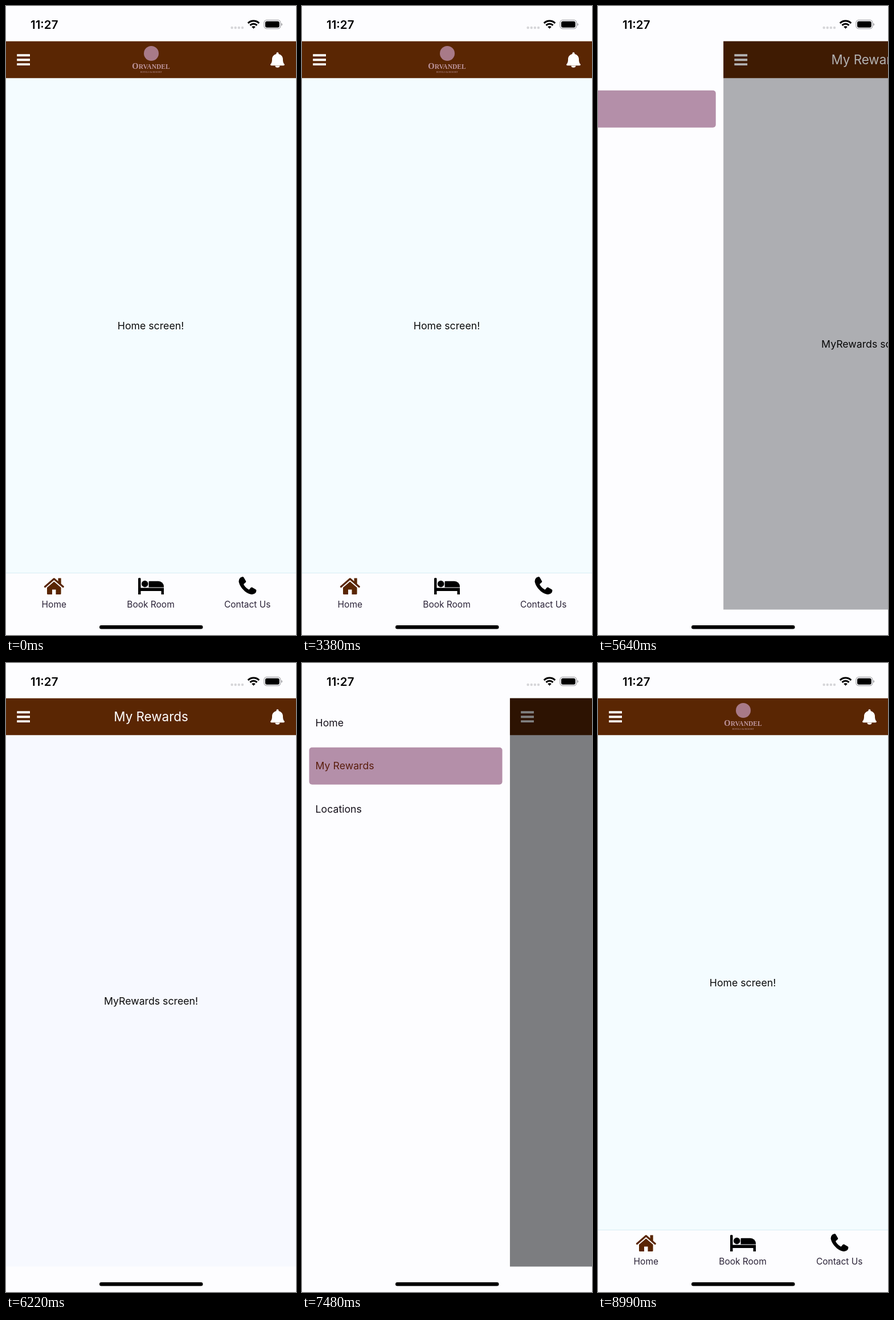
An HTML page that plays this animation: 509x1101 px, repeating every 9030 ms.

```html
<!DOCTYPE html>
<html lang="en">
<head>
<meta charset="utf-8">
<title>Drawer navigation</title>
<style>
  html, body { margin: 0; width: 100%; height: 100%; overflow: hidden; background: #fdfdff; }
  svg { display: block; width: 100vw; height: 100vh; font-family: Inter, sans-serif; }
  .mid { text-anchor: middle; }
  .body { font-size: 17.7px; fill: #0a0a0a; }
  .title { font-size: 22.4px; fill: #fff; }
  .tab { font-size: 15.5px; fill: #2b2338; }
  .logo { font-family: "Liberation Serif", serif; fill: #bd949c; }
  .brown { fill: #5a2603; }
</style>
</head>
<body>
<svg viewBox="0 0 509 1101" preserveAspectRatio="none">
  <defs>
    <clipPath id="safe"><rect y="61.5" width="509" height="995"/></clipPath>
    <g id="bell" fill="#fff">
      <path d="M476.500 81c-1.200 0-2 .9-2 2v1c-4.500 1-7.500 4.700-7.500 9.300 0 5-1.200 7-2.400 8.300-1 1.100-.6 2.600 1.200 2.600h21.400c1.800 0 2.200-1.500 1.200-2.600-1.200-1.300-2.400-3.300-2.400-8.300 0-4.600-3-8.300-7.500-9.300v-1c0-1.100-.8-2-2-2z"/>
      <path d="M472.500 104.500h8a4 3.300 0 0 1-8 0z"/>
    </g>
  </defs>

  <rect width="509" height="1101" fill="#fdfdff"/>

  <g clip-path="url(#safe)">
    <g id="slider">
      <g transform="translate(-365.4)">
        <rect id="focus" x="13" y="72" width="339" height="65" rx="5" fill="#b48fa9"/>
        <g class="body">
          <text class="label" x="24" y="110.500">Home</text>
          <text class="label" x="24" y="186.300">My Rewards</text>
          <text class="label" x="24" y="262">Locations</text>
        </g>
      </g>

      <rect y="61.500" width="509" height="65" class="brown"/>

      <g id="home">
        <rect y="126.500" width="509" height="866" fill="#f4fcff"/>
        <g class="logo mid">
          <circle cx="255" cy="83" r="13" fill="#a87a88"/>
          <text x="254.500" y="110" font-size="14.500" font-weight="bold">O<tspan font-size="11.500">RVANDEL</tspan></text>
          <text x="254.500" y="116.500" font-size="4.300">HOTELS &amp; RESORT</text>
        </g>
        <text class="body mid" x="254" y="565.500">Home screen!</text>

        <rect y="992.500" width="509" height="65" fill="#fdfdff"/>
        <path d="M0 992.500H509" stroke="#d6edf4"/>
        <g class="brown">
          <path d="M68.500 1016.500L84.300 1002.800 100.200 1016.500" fill="none" stroke="#5a2603" stroke-width="3.200" stroke-linecap="round" stroke-linejoin="round"/>
          <path d="M91.500 1001.500h5.200v11l-5.200-4.500z"/>
          <path d="M72 1018L84.300 1007.500 96.600 1018V1028.500q0 1.500-1.500 1.500H87.500V1021.500H81V1030H73.500q-1.500 0-1.500-1.500z"/>
        </g>
        <path d="M232 1002.500q0-1.500 1.500-1.500h1.500q1.500 0 1.500 1.500V1018.500H277V1030H272.500V1024H236.500V1030H232z"/>
        <circle cx="243.700" cy="1011.500" r="5.700"/>
        <path d="M250.500 1008q0-1.300 1.300-1.300H267.500a9.500 9.500 0 0 1 9.500 9.500v1.200H250.500z"/>
        <path transform="translate(408.500 999)" d="M7 0Q8.200-.1 9 1.600L12.600 7.800Q13.200 8.900 12 10L9.400 12.300Q8.400 13.200 9 14.300 12 19.300 17.200 22.300 18.200 22.800 19 21.800L21.200 19.100Q22.200 18 23.300 18.600L29.800 22.200Q31 22.900 30.900 24.200 30.700 26.500 29.800 28 27.500 30.600 23.200 31 17.500 30.800 11 25.800 2 18 .2 9.500-.4 6 1.600 3 3 .6 7 0z"/>
        <g class="tab mid">
          <text x="84.300" y="1053">Home</text>
          <text x="254" y="1053">Book Room</text>
          <text x="423.700" y="1053">Contact Us</text>
        </g>
      </g>

      <g id="rewards">
        <rect y="126.500" width="509" height="931" fill="#f7f9ff"/>
        <text class="title mid" x="254.500" y="102.300">My Rewards</text>
        <text class="body mid" x="254.500" y="597.500">MyRewards screen!</text>
      </g>

      <path id="burger" d="M19.200 86.300H42M19.200 94.200H42M19.200 102.100H42" stroke="#fff" stroke-width="3.900"/>
      <use href="#bell"/>
      <rect id="shade" y="61" width="509" height="997"/>
    </g>
  </g>

  <text x="43" y="39.800" font-size="20.500" font-weight="600">11:27</text>
  <path d="M396.600 38H416" stroke="#d6d6d9" stroke-width="4.400" stroke-linecap="round" stroke-dasharray="0 6.130"/>
  <g transform="translate(434.500 39.800)" fill="none" stroke="#000" stroke-width="3.100">
    <path d="M-9.700-9.700A13.700 13.700 0 0 1 9.700-9.700M-6-6A8.500 8.500 0 0 1 6-6"/>
    <path d="M0 0L-3.300-3.300A4.700 4.700 0 0 1 3.300-3.300z" fill="#000" stroke="none"/>
  </g>
  <rect x="453" y="24.700" width="28.800" height="15" rx="4.600" fill="none" stroke="#a4a4a8" stroke-width="1.300"/>
  <rect x="455" y="26.700" width="24.800" height="11" rx="2.900"/>
  <path d="M483.200 29.700q1.900 .8 1.900 2.500t-1.900 2.500z" fill="#a4a4a8"/>
  <rect x="164" y="1084" width="181.500" height="6.500" rx="3.250"/>
</svg>

<script>
  const LOOP = 9030, DRAWER = 365.4, OMEGA = Math.sqrt(1000 / 3) / 1000;
  const moves = [[4664, 1], [5566, 0], [6987, 1], [8112, 0]];
  const onRewards = [5555, 8060];
  const $ = id => document.getElementById(id);
  const labels = document.querySelectorAll('.label');

  // Critically damped spring, 0 to 1
  const spring = ms => 1 - (1 + OMEGA * ms) * Math.exp(-OMEGA * ms);
  const easeInOut = k => k < .5 ? 2 * k * k : 1 - 2 * (1 - k) ** 2;

  // Dims at once on press, fades back after release
  function touch(t, down, up, low, fade) {
    if (t < down || t > up + fade) return 1;
    return t < up ? low : low + (1 - low) * easeInOut((t - up) / fade);
  }

  function openness(t) {
    const move = moves.filter(m => m[0] <= t).pop();
    if (!move) return 0;
    const s = spring(t - move[0]);
    return move[1] ? s : 1 - s;
  }

  function draw(t) {
    const p = openness(t);
    const rewards = t >= onRewards[0] && t < onRewards[1];
    $('slider').setAttribute('transform', `translate(${(p * DRAWER).toFixed(2)})`);
    $('shade').setAttribute('opacity', p / 2);
    $('home').style.display = rewards ? 'none' : '';
    $('rewards').style.display = rewards ? '' : 'none';
    $('focus').setAttribute('y', rewards ? 147.8 : 72);
    $('burger').setAttribute('opacity',
      touch(t, 4490, moves[0][0], .2, 250) * touch(t, 6790, moves[2][0], .2, 250));
    labels.forEach((label, i) => {
      label.style.fill = i === +rewards ? '#5a1e0e' : '#15101a';
    });
    labels[0].setAttribute('opacity', touch(t, 7870, 8050, .3, 200));
    labels[1].setAttribute('opacity', touch(t, 5400, 5550, .3, 200));
  }

  const start = performance.now();
  function tick() {
    draw((performance.now() - start) % LOOP);
    requestAnimationFrame(tick);
  }
  tick();
</script>
</body>
</html>
```
